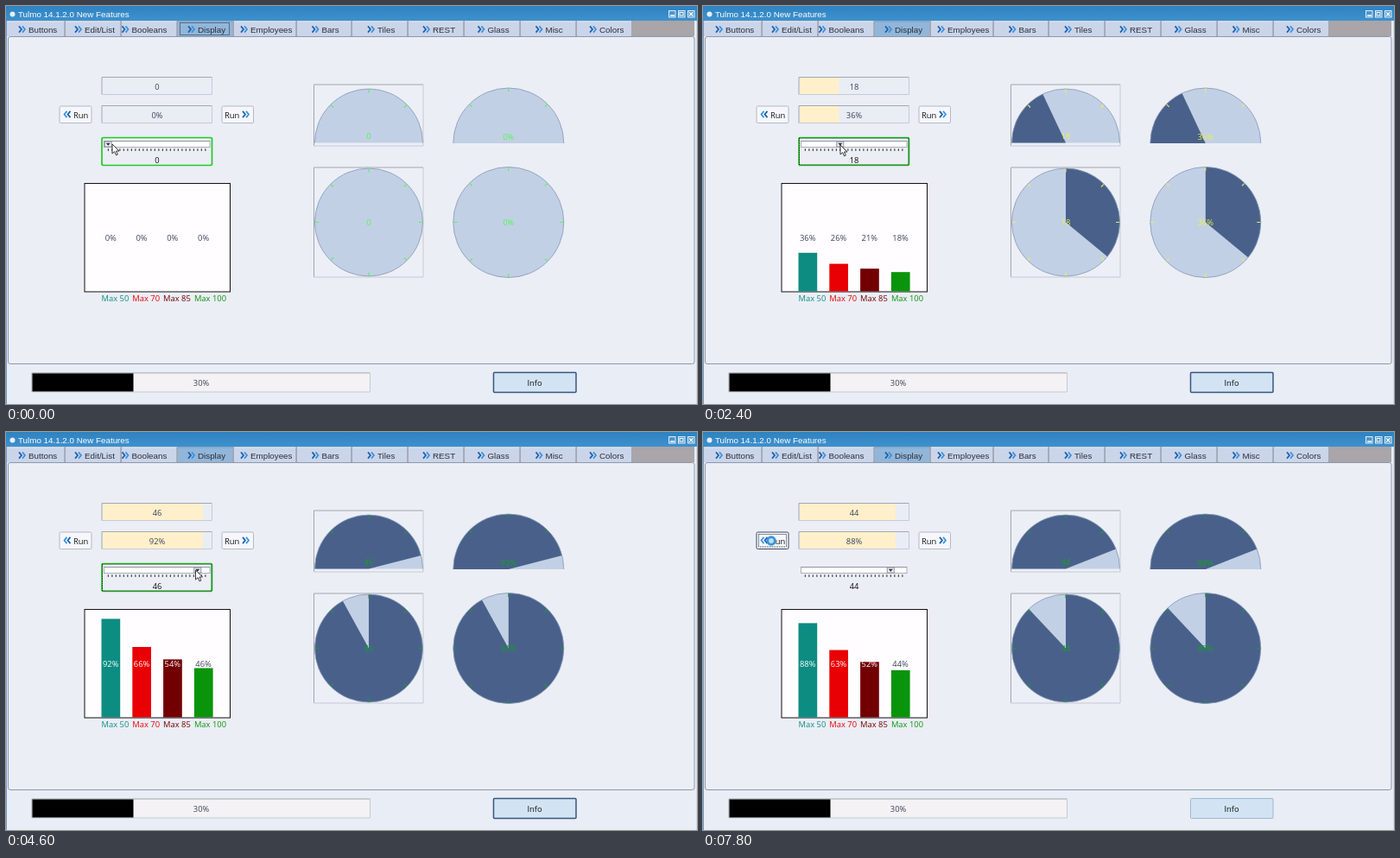
An HTML page for the animation above (8 s loop, 800 by 461 pixels).

```html
<!DOCTYPE html>
<html lang="en">
<head>
<meta charset="utf-8">
<title>Display items</title>
<style>
html, body { margin: 0; width: 100%; height: 100%; overflow: hidden; background: #e9edf5; }
svg { display: block; width: 100%; height: 100%; }
text { font: 9.4px "Open Sans", "Noto Sans", sans-serif; fill: #3c4358; }
.ui { font: 9.8px "Liberation Sans", Arial, sans-serif; fill: #2c2f38; }
.mid { text-anchor: middle; }
</style>
</head>
<body>
<svg id="stage" viewBox="0 0 800 461"></svg>
<script>
const LOOP = 8000, STEP = 200;
const stage = document.getElementById('stage');

function add(tag, attrs, text) {
  const el = document.createElementNS('http://www.w3.org/2000/svg', tag);
  set(el, attrs);
  if (text !== undefined) el.textContent = text;
  return stage.appendChild(el);
}
function set(el, attrs) {
  for (const k in attrs) el.setAttribute(k, attrs[k]);
}
const rect = (x, y, width, height, fill, more) => add('rect', { x, y, width, height, fill, ...more });
const path = (d, fill, more) => add('path', { d, fill, ...more });
const label = (x, y, text, more) => add('text', { x, y, ...more }, text);
const centred = (x, y, text, more) => label(x, y, text, { class: 'mid', ...more });
const show = (el, on) => el.setAttribute('visibility', on ? 'visible' : 'hidden');

function inset(x, y, w, h) {
  path(`M${x} ${y + h}V${y}H${x + w}`, 'none', { stroke: '#a3a7ae' });
  path(`M${x} ${y + h}H${x + w}V${y}`, 'none', { stroke: '#c6cad2' });
}
function chevrons(x, y, dir) {
  for (const [dx, colour] of [[-3, '#1b5fae'], [1, '#3a92dc']])
    path(`M${x + dir * dx} ${y - 3.6}l${dir * 3} 3.6l${-dir * 3} 3.6`, 'none',
      { stroke: colour, 'stroke-width': 1.7 });
}

// Linear interpolation over rows of [time, ...values]
function at(keys, t) {
  let i = 1;
  while (i < keys.length - 1 && keys[i][0] < t) i++;
  const a = keys[i - 1], b = keys[i];
  const k = Math.min(1, Math.max(0, (t - a[0]) / (b[0] - a[0])));
  return a.slice(1).map((v, j) => v + (b[j + 1] - v) * k);
}

// Angles in degrees, clockwise from twelve o'clock
function polar(g, r, deg) {
  const a = deg * Math.PI / 180;
  return `${(g.x + r * Math.sin(a)).toFixed(2)} ${(g.y - r * Math.cos(a)).toFixed(2)}`;
}
function sector(g, sweep) {
  if (sweep <= 0) return '';
  return `M${g.x} ${g.y}L${polar(g, g.r, g.from)}` +
    `A${g.r} ${g.r} 0 ${sweep > 180 ? 1 : 0} 1 ${polar(g, g.r, g.from + sweep)}Z`;
}

// Window
add('defs', {}).innerHTML =
  '<linearGradient id="bar" x2="0" y2="1"><stop stop-color="#2f82c0"/><stop offset="1" stop-color="#3d91cd"/></linearGradient>';
rect(0, 0, 800, 461, '#e9edf5');
rect(0, 0, 800, 17, 'url(#bar)');
rect(0, 17, 1, 444, '#6d9cc8');
rect(799, 17, 1, 444, '#d3dcea');
add('circle', { cx: 7.5, cy: 9.5, r: 3, fill: '#e4f0fa' });
label(14, 13, 'Tulmo 14.1.2.0 New Features', { class: 'ui', style: 'fill:#fff' });
for (const x of [767, 778, 789])
  rect(x + .5, 5.5, 7.5, 7.5, '#4c97cd', { stroke: '#e3eef8' });
path('M769 11h5', 'none', { stroke: '#fff', 'stroke-width': 1.5 });
rect(780, 7.5, 4, 3.5, 'none', { stroke: '#fff' });
path('M791 7.2l4.3 4.3m0-4.3l-4.3 4.3', 'none', { stroke: '#fff', 'stroke-width': 1.3 });

// Tabs: name, left edge, text start
rect(1, 17, 796, 18, '#a9a5a9');
const tabs = [['Buttons', 1, 26], ['Edit/List', 69, 91], ['Booleans', 134, 145.5], ['Display', 199, 222],
  ['Employees', 264, 283], ['Bars', 337, 365.5], ['Tiles', 401, 430], ['REST', 466, 494],
  ['Glass', 531, 557.5], ['Misc', 596, 624.5], ['Colors', 661, 687], ['', 725.5]];
tabs.slice(0, -1).forEach(([name, x, tx], i) => {
  const w = tabs[i + 1][1] - x - 1.5;
  rect(x, 17.5, w, 17.5, name === 'Display' ? '#92b6d9' : '#cbd5ea', { rx: 1 });
  path(`M${x} 18h${w}`, 'none', { stroke: name === 'Display' ? '#7da5ce' : '#dfe6f3' });
  path(`M${x + w + .5} 18v17`, 'none', { stroke: '#9ba6b9' });
  chevrons(tx - 8, 27, 1);
  label(tx, 30.7, name, { class: 'ui' });
});
const tabFocus = rect(201.5, 19.5, 57, 14, 'none', { stroke: '#223', 'stroke-dasharray': '1 1' });

// Panel and footer
rect(2.5, 35.5, 794.5, 379, '#ebeef5', { stroke: '#8c98ae', rx: 2.5 });
rect(30, 425, 391.5, 22, '#f4f2f4');
inset(30, 425, 391.5, 22);
rect(30.5, 425.5, 117, 21, '#000');
centred(226, 440, '30%');
const info = rect(564.5, 424.5, 95.5, 23, '#d2e4f4', { rx: 1 });
centred(612, 440, 'Info', { style: 'fill:#111' });

// Two progress fields
const fields = [82.5, 115.5].map(y => {
  rect(111, y, 127.5, 20, '#e9edf4');
  const fill = rect(112, y + .5, 0, 19, '#fff0cb');
  inset(111, y, 127.5, 20);
  return { fill, text: centred(175, y + 14.3, '') };
});

// Run buttons
const runLeft = rect(62, 116, 37, 19.5, '#f5f7fb', { rx: 1.5 });
const runFocus = rect(64.5, 118.5, 32, 14.5, 'none', { stroke: '#222', 'stroke-dasharray': '1 1' });
rect(250, 116, 36.5, 19.5, '#f5f7fb', { rx: 1.5, stroke: '#b3b8c3' });
chevrons(71.5, 125.5, -1);
label(78, 130, 'Run', { style: 'fill:#111' });
label(253, 130, 'Run', { style: 'fill:#111' });
chevrons(277, 125.5, 1);

// Slider
const ring = rect(111, 152.5, 127.5, 32, 'none', { stroke: '#21c927', 'stroke-width': 1.7, rx: 1.5 });
const dots = rect(111.5, 153, 126.5, 31, 'none', { stroke: '#111', 'stroke-dasharray': '1 1' });
const track = rect(113.5, 156.5, 122.5, 7, '#fff', { stroke: '#a9aeb8' });
path('M113.5 156.5H236', 'none', { stroke: '#8e949f' });
const thumb = add('g', {});
thumb.innerHTML = '<rect x="-4" y="157" width="8" height="6" fill="#eef1f7" stroke="#8c93a2"/>' +
  '<path d="M-2.6 158.8h5.2l-2.6 3z" fill="#333"/>';
for (let i = 0; i <= 25; i++)
  rect(117.8 + i * 4.5, 165.3, 1.1, 2.6, '#333');
const sliderText = centred(175, 181.5, '', { style: 'fill:#111' });

// Bar chart
rect(91, 205.5, 168.5, 125.5, '#fffdff', { stroke: '#111' });
const bars = [[50, '#0d8c82'], [70, '#e80004'], [85, '#720003'], [100, '#0a940c']].map(([max, colour], i) => {
  const x = 110.5 + i * 35.8;
  label(x, 342, 'Max ' + max, { style: `fill:${colour}` });
  return { max, bar: rect(x, 330.5, 21.7, 0, colour), text: centred(x + 10.7, 272, '') };
});

// Gauges
const gauges = [
  { x: 420, y: 158.5, r: 62.5, box: [356.5, 91, 126.5, 71], ty: 153.5 },
  { x: 581.8, y: 159, r: 64, unit: '%', ty: 154.5 },
  { x: 420, y: 250.5, r: 62.5, round: true, box: [356.5, 187, 126.5, 127], ty: 254.3 },
  { x: 581.8, y: 250.5, r: 64, round: true, unit: '%', ty: 254.3 }
];
for (const g of gauges) {
  g.from = g.round ? 0 : -90;
  g.span = g.round ? 360 : 180;
  if (g.box) {
    const [x, y, w, h] = g.box;
    rect(x, y, w, h, '#eceff6');
    inset(x, y, w, h);
  }
  const rim = g.round ? sector(g, 180) + sector({ ...g, from: 180 }, 180) : sector(g, 180);
  path(rim, '#c2d0e5');
  g.fill = path('', '#49618a');
  const arc = `M${polar(g, g.r, g.from)}A${g.r} ${g.r} 0 0 1 ${polar(g, g.r, g.from + 180)}` +
    (g.round ? `A${g.r} ${g.r} 0 0 1 ${polar(g, g.r, 0)}` : '');
  path(arc, 'none', { stroke: '#8597b8', 'stroke-width': .8 });
  let ticks = '';
  for (let a = g.from + (g.round ? 0 : 45); a < g.from + g.span; a += 45)
    ticks += `M${polar(g, g.r - .5, a)}L${polar(g, g.r - 4.5, a)}`;
  g.ticks = path(ticks, 'none', { 'stroke-width': 1.1 });
  g.text = centred(g.x, g.ty, '');
}

// Pointers
const arrow = path('M0 0V11L2.6 8.6L4.5 12.8L6.3 12L4.5 8H8Z', '#fff', { stroke: '#222', 'stroke-width': .9 });
const busy = add('circle', { cx: 79, cy: 126, r: 4.3, fill: '#b9def5', stroke: '#3994d6', 'stroke-width': 2.8 });

const slide = [[0, 0], [800, 0], [1000, 4], [2200, 18], [2600, 18], [3600, 36], [3800, 38],
  [4400, 46], [7400, 46], [7800, 44]];
const pointer = [[0, 123, 160], [800, 123, 160], [1000, 127, 160], [2200, 159, 161], [2600, 159, 161],
  [3600, 200, 160], [3800, 204.5, 160], [4400, 219.5, 160], [5400, 219.5, 160],
  [6200, 131.5, 153], [6800, 78, 124]];
const PRESS = 7400;

function draw(time) {
  const t = Math.floor(time / STEP) * STEP;
  const running = t >= PRESS;
  const pos = Math.round(at(slide, t)[0]);
  // The items follow the slider one step late
  const value = running ? pos : Math.round(at(slide, t - STEP)[0]);
  const share = value / 50, percent = Math.round(share * 100);

  show(tabFocus, t < 800);
  show(ring, !running);
  show(dots, t >= 800 && !running);
  show(runFocus, running);
  set(runLeft, { stroke: running ? '#34496b' : '#b3b8c3' });
  set(info, { stroke: running ? '#a0b5cd' : '#37557f', 'stroke-width': running ? 1 : 1.5 });

  fields.forEach((f, i) => {
    set(f.fill, { width: 126 * share });
    f.text.textContent = i ? percent + '%' : value;
  });

  set(track, { fill: pos !== value ? '#c0cee4' : '#fff' });
  set(thumb, { transform: `translate(${118.3 + pos * 2.25} 0)` });
  sliderText.textContent = pos;

  for (const b of bars) {
    const part = value / b.max, h = 124 * part;
    set(b.bar, { y: 330.5 - h, height: h });
    b.text.textContent = Math.round(part * 100) + '%';
    b.text.style.fill = part > .5 ? '#fff' : '#3c4358';
  }

  const tint = percent < 20 ? '#4dfa4d' : percent < 80 ? '#eaf04e' : '#12a022';
  for (const g of gauges) {
    set(g.fill, { d: sector(g, g.span * share) });
    set(g.ticks, { stroke: tint });
    g.text.textContent = g.unit ? percent + g.unit : value;
    g.text.style.fill = tint;
  }

  const [px, py] = at(pointer, t);
  set(arrow, { transform: `translate(${px} ${py})` });
  show(arrow, !running);
  show(busy, running);
}

const start = performance.now();
function tick() {
  draw((performance.now() - start) % LOOP);
  requestAnimationFrame(tick);
}
tick();
</script>
</body>
</html>
```
